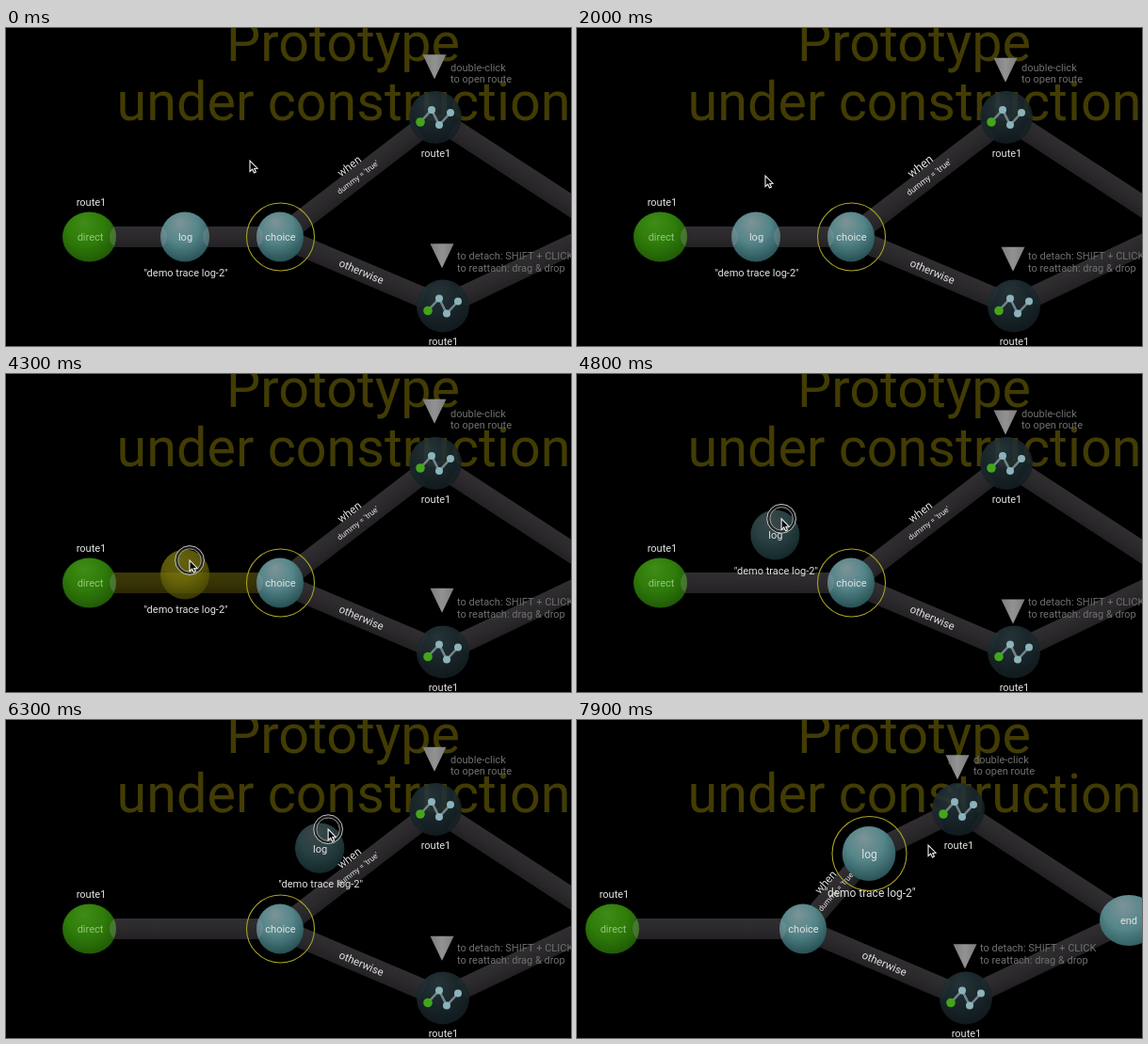
Write an HTML page with a canvas that moves like this. It is 600 px wide and 338 px high and loops after 8000 ms.

```html
<!DOCTYPE html>
<html lang="en">
<head>
<meta charset="utf-8">
<title>Route editor</title>
<style>
  html, body { margin: 0; width: 100%; height: 100%; overflow: hidden; background: #000; }
  canvas { display: block; width: 600px; height: 338px; }
</style>
</head>
<body>
<canvas id="stage" width="600" height="338"></canvas>
<script>
const c = document.getElementById('stage').getContext('2d');
const LOOP = 8000, HOVER = 3000, PRESS = 3950, DROP = 6700;
const TEAL = ['#7e9396', '#55868a', '#254f52'];
const GREEN = ['#3f8c18', '#2f7c0a', '#1d5206'];
const YELLOW = ['#8d8718', '#7d780a', '#4c4904'];
const DARK = ['#2a393e', '#1d2b30', '#121c20'];

// Rows: time, x, y
const cursorPath = [[0, 259, 141], [2000, 200, 157], [3500, 195, 212], [3900, 195, 212],
  [4300, 195, 198], [5400, 246, 96], [DROP, 370, 122], [7300, 382, 124], [7900, 373, 133]];
const logPath = [[PRESS, 190, 222], [4300, 190, 213], [5400, 237, 116], [DROP, 361, 142]];

const clamp = v => Math.min(1, Math.max(0, v));
const smooth = v => (v = clamp(v), v * v * (3 - 2 * v));

function along(path, t) {
  let i = 0;
  while (i < path.length - 2 && t > path[i + 1][0]) i++;
  const [t0, x0, y0] = path[i], [t1, x1, y1] = path[i + 1];
  const k = smooth((t - t0) / (t1 - t0));
  return { x: x0 + (x1 - x0) * k, y: y0 + (y1 - y0) * k };
}

function text(str, x, y, size = 11, color = '#e2e2e2', align = 'center') {
  c.font = `${size}px Roboto, sans-serif`;
  c.fillStyle = color;
  c.textAlign = align;
  c.textBaseline = 'alphabetic';
  c.fillText(str, x, y + size * 0.36);
}

function circle(x, y, r, color, width) {
  c.beginPath();
  c.arc(x, y, r, 0, 7);
  if (width) {
    c.strokeStyle = color;
    c.lineWidth = width;
    c.stroke();
  } else {
    c.fillStyle = color;
    c.fill();
  }
}

function pipe(a, b, lit) {
  c.save();
  c.translate(a.x, a.y);
  c.rotate(Math.atan2(b.y - a.y, b.x - a.x));
  const g = c.createLinearGradient(0, -11, 0, 11);
  const shades = lit ? ['#3d3908', '#383406', '#2c2904'] : ['#302e31', '#2b292c', '#232124'];
  shades.forEach((s, i) => g.addColorStop(i / 2, s));
  c.fillStyle = g;
  c.fillRect(22, -11, Math.hypot(b.x - a.x, b.y - a.y) - 44, 22);
  c.restore();
}

// Text centred on a pipe, lifted off its axis
function pipeText(a, b, str, size, lift) {
  c.save();
  c.translate((a.x + b.x) / 2, (a.y + b.y) / 2);
  c.rotate(Math.atan2(b.y - a.y, b.x - a.x));
  text(str, 0, -lift, size);
  c.restore();
}

function ball(p, rx, ry, shades, alpha = 1, sides = []) {
  c.save();
  c.globalAlpha = alpha;
  c.translate(p.x, p.y);
  c.beginPath();
  c.ellipse(0, 0, rx, ry, 0, 0, 7);
  const g = c.createRadialGradient(-rx * 0.2, -ry * 0.6, 0, -rx * 0.1, -ry * 0.3, rx * 1.4);
  shades.forEach((s, i) => g.addColorStop(i / 2, s));
  c.fillStyle = g;
  c.fill();
  c.clip();
  c.fillStyle = 'rgba(165,160,165,.27)';
  for (const s of sides) {
    c.beginPath();
    c.ellipse(s * (rx + 1), 0, 8, 11, 0, 0, 7);
    c.fill();
  }
  c.restore();
}

function routeNode(p, bob, dx, lines) {
  ball(p, 28, 28, DARK, 0.88);
  const dots = [[-16, 5], [-4, -8], [4, 8], [16, -5]];
  c.beginPath();
  dots.forEach(([x, y]) => c.lineTo(p.x + x, p.y + y));
  c.strokeStyle = '#70868b';
  c.lineWidth = 2.5;
  c.stroke();
  dots.forEach(([x, y], i) => circle(p.x + x, p.y + y, i ? 4 : 4.8, i ? '#8bb3ba' : '#44a51c'));
  text('route1', p.x + 0.5, p.y + 38);

  const x = p.x - 1, y = p.y - 95 + bob;
  const g = c.createLinearGradient(x - 13, 0, x + 13, 0);
  g.addColorStop(0, '#7c7c7c');
  g.addColorStop(0.5, '#929292');
  g.addColorStop(1, '#7c7c7c');
  c.fillStyle = g;
  c.beginPath();
  c.moveTo(x - 12.5, y);
  c.lineTo(x + 12.5, y);
  c.lineTo(x, y + 26);
  c.fill();
  lines.forEach((s, i) => text(s, p.x + dx, p.y - 53 + i * 12.3, 11, '#707070', 'left'));
}

function drawCursor({ x, y }) {
  c.beginPath();
  [[0, 0], [0, 11.5], [2.6, 9.2], [4.5, 13], [6.4, 12.1], [4.7, 8.4], [8, 8.2]]
    .forEach(([dx, dy]) => c.lineTo(x + dx, y + dy));
  c.closePath();
  c.fillStyle = '#000';
  c.fill();
  c.strokeStyle = '#f2f2f2';
  c.lineWidth = 1.1;
  c.stroke();
}

function draw(t) {
  c.fillStyle = '#000';
  c.fillRect(0, 0, 600, 338);
  text('Prototype', 358, 14.3, 57.5, '#423c04');
  text('under construction', 358.5, 77.3, 57.5, '#423c04');

  const dragging = t >= PRESS && t < DROP, dropped = t >= DROP;
  const hovered = t >= HOVER && t < PRESS;
  const overFirst = dragging && t < 4700, overWhen = dragging && t > 6350;
  const bob = 32.7 - 6.3 * Math.cos(2 * Math.PI * (0.00095 * t - 0.13));

  const direct = { x: 88.5, y: 222 }, choice = { x: 291, y: 222 }, end = { x: 637, y: 213 };
  const top = { x: 456, y: 95 }, low = { x: 464, y: 295.5 };
  const log = along(logPath, t);
  const grow = 1 + 0.09 * smooth((t - 6200) / 600);

  c.save();
  c.translate(-51 * smooth((t - 7300) / 600), 0);

  if (t < PRESS) {
    pipe(direct, log);
    pipe(log, choice);
  } else {
    pipe(direct, choice, overFirst);
  }
  const branch = dropped ? log : top;
  pipe(choice, branch, overWhen);
  if (dropped) pipe(log, top);
  pipe(choice, low);
  pipe(top, end);
  pipe(low, end);

  const swell = 1 + 0.08 * (1 - smooth(Math.abs(t - 2000) / 600));
  pipeText(choice, branch, 'when', 11.8 * swell, 15);
  pipeText(choice, branch, "dummy = 'true'", 8.2 * swell, 0);
  pipeText(choice, low, 'otherwise', 11.5, 0);

  ball(direct, 28.5, 26.5, GREEN, 1, [1]);
  text('direct', 89.5, 222.5, 11, '#93c776');
  text('route1', 90.5, 185.5);
  ball(choice, 25, 26.5, TEAL, 1, [-1]);
  text('choice', 291.5, 222.5);
  ball(end, 31, 27, TEAL);
  text('end', 637, 213);

  routeNode(top, bob, 16, ['double-click', 'to open route']);
  routeNode(low, bob + 0.5, 15, ['to detach: SHIFT + CLICK', 'to reattach: drag & drop']);

  const yellow = hovered || overFirst;
  ball(log, 26 * grow, 26.5 * grow, yellow ? YELLOW : TEAL,
    dragging ? (overFirst ? 0.72 : 0.48) : 1, t < PRESS ? [-1, 1] : []);
  if (!overFirst) text('log', log.x + 0.5, log.y + 0.5, 11 * grow);
  text('"demo trace log-2"', log.x + 1, overFirst ? Math.min(250.5, log.y + 37.5) : log.y + 38 * grow,
    11 * (hovered ? 1.04 : grow));

  const picked = dropped ? log : choice;
  circle(picked.x + 0.5, picked.y, dropped ? 39.5 : 36, '#aaa326', 1.1);
  c.restore();

  const tip = along(cursorPath, t);
  if (dragging) {
    circle(tip.x, tip.y, 13.8, 'rgba(30,30,30,.75)', 3);
    circle(tip.x, tip.y, 15.4, '#c4c4c4', 1);
    circle(tip.x, tip.y, 12.2, '#a8a8a8', 0.9);
  }
  drawCursor(tip);
}

function frame() {
  draw(performance.now() % LOOP);
  requestAnimationFrame(frame);
}
frame();
</script>
</body>
</html>
```
